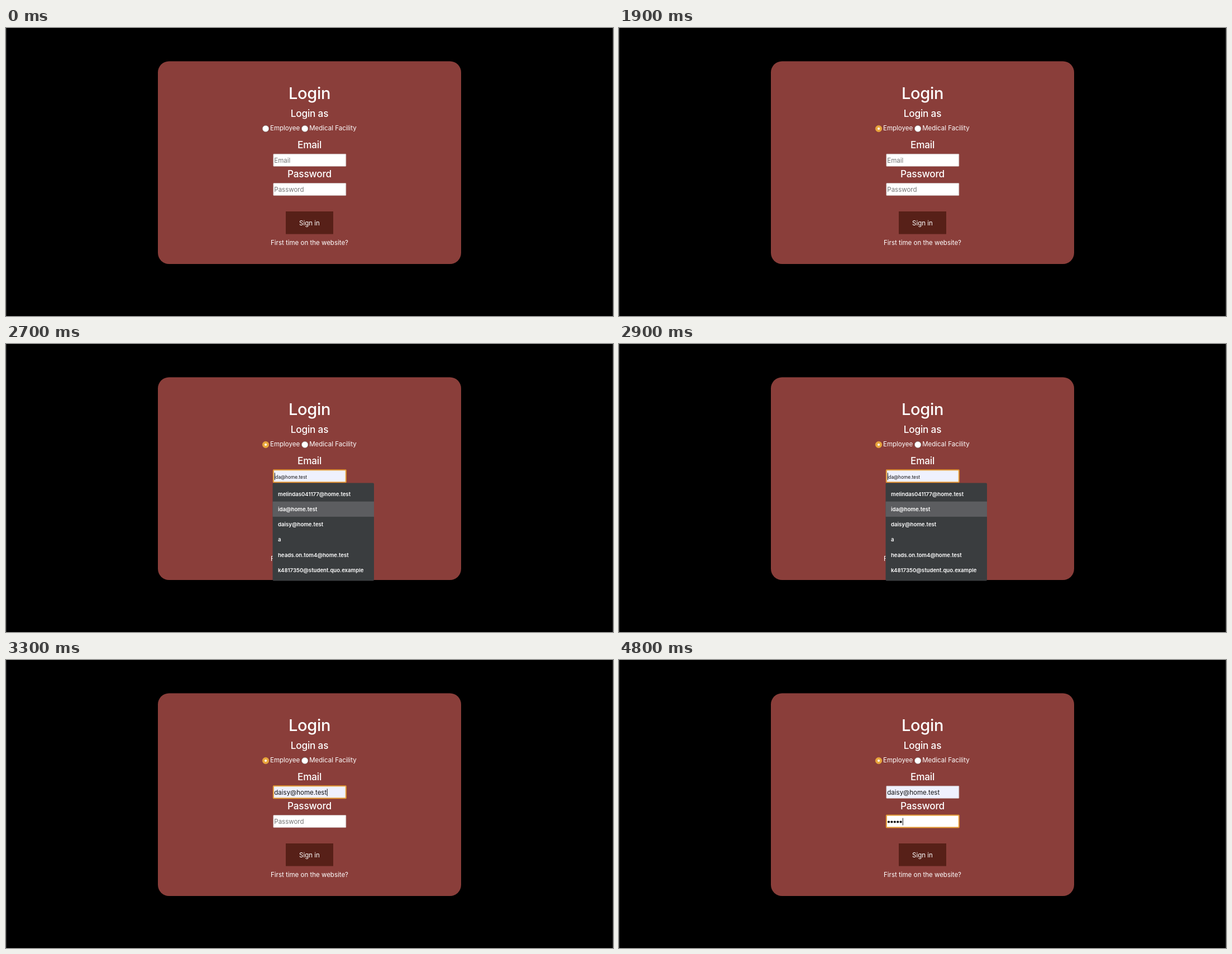
Recreate the animation shown at these times as an HTML page. Size 1087x515 px, loop 4900 ms.

```html
<!DOCTYPE html>
<html lang="en">
<head>
<meta charset="utf-8">
<title>Login</title>
<style>
  html, body { margin: 0; width: 100%; height: 100%; overflow: hidden; background: #000; }
  svg { display: block; }
  text { font: 11.5px Inter, "Open Sans", sans-serif; fill: #fff; }
  .mid { text-anchor: middle; }
  .title { font-size: 29px; font-weight: 500; letter-spacing: -.3px; }
  .head { font-size: 17.2px; font-weight: 500; letter-spacing: -.2px; }
  .field { fill: #fff; stroke: #c4b4b4; stroke-width: .8; }
  .field.filled { fill: #eff1fe; }
  .field.focus { stroke: #e39a35; stroke-width: 2; }
  .value { fill: #111; }
  .value.hint { fill: #767676; }
  .value.preview { font-size: 8.3px; }
  .caret { fill: #111; }
  .item { font-size: 9.6px; font-weight: 600; }
</style>
</head>
<body>
<svg width="1087" height="515" viewBox="0 0 1087 515">
  <path d="M.5 0V515M1086.5 0V515" stroke="#303030"/>
  <rect x="272" y="59.5" width="543" height="362.5" rx="20" fill="#8a3e3a"/>

  <text class="mid title" x="543.5" y="127">Login</text>
  <text class="mid head" x="543.5" y="159">Login as</text>
  <circle id="radio" cx="465" cy="180" r="5.8"/>
  <circle id="radioDot" cx="465" cy="180" r="2" fill="#fff"/>
  <text x="473" y="183">Employee</text>
  <circle cx="535.2" cy="180" r="5.8" fill="#fff" stroke="#777" stroke-width=".6"/>
  <text x="543.2" y="183">Medical Facility</text>

  <text class="mid head" x="543.5" y="215">Email</text>
  <g id="email"></g>
  <text class="mid head" x="543.5" y="267">Password</text>
  <g id="password"></g>

  <rect x="501" y="328" width="85" height="40.5" fill="#572018"/>
  <text class="mid" x="543.5" y="352.7">Sign in</text>
  <text class="mid" x="543.5" y="388">First time on the website?</text>

  <g id="menu">
    <rect x="477.5" y="248.5" width="181.5" height="175" rx="2" fill="#3a3d3f"/>
    <rect id="hover" x="477.5" width="181.5" height="27.2" fill="#5c5d60"/>
  </g>
</svg>
<script>
const LOOP = 4900;
const ROW = 27.2;
const SELECT = 1500, OPEN = 2100, CHOOSE = 3300, NEXT = 3800, TYPE = 4100;
const KEY_GAP = 120, KEYS = 5, DOT_GAP = 5.4;
const HOVERS = [2500, 2700, 3100];
const EMAILS = [
  'melindas041177@home.test',
  'ida@home.test',
  'daisy@home.test',
  'a',
  'heads.on.tom4@home.test',
  'k4817350@student.quo.example'
];

const $ = id => document.getElementById(id);

function add(parent, tag, attrs, text = '') {
  const el = document.createElementNS('http://www.w3.org/2000/svg', tag);
  for (const key in attrs) el.setAttribute(key, attrs[key]);
  el.textContent = text;
  return parent.appendChild(el);
}

const show = (el, on) => el.setAttribute('visibility', on ? 'visible' : 'hidden');

function makeField(id, y) {
  const g = $(id);
  return {
    box: add(g, 'rect', { x: 478.8, y, width: 130, height: 22, rx: .8 }),
    text: add(g, 'text', { x: 480.3, y: y + 15.7 }),
    caret: add(g, 'rect', { class: 'caret', y: y + 5, width: 1, height: 13 })
  };
}

function setField(field, { value, style = '', filled, focus, caretX }) {
  field.box.setAttribute('class', `field ${filled ? 'filled' : ''} ${focus ? 'focus' : ''}`);
  field.text.setAttribute('class', 'value ' + style);
  field.text.textContent = value;
  show(field.caret, caretX !== undefined);
  if (caretX !== undefined) field.caret.setAttribute('x', caretX);
}

const email = makeField('email', 225.3);
const password = makeField('password', 277.6);
const dots = Array.from({ length: KEYS }, (_, i) =>
  add($('password'), 'circle', { cx: 483 + i * DOT_GAP, cy: 289.5, r: 2.1, fill: '#111' }));
EMAILS.forEach((name, i) =>
  add($('menu'), 'text', { class: 'item', x: 487, y: 271.8 + i * ROW }, name));

function draw(t) {
  const checked = t >= SELECT;
  $('radio').setAttribute('fill', checked ? '#e8a53c' : '#fff');
  $('radio').setAttribute('stroke', checked ? '#e8a53c' : '#777');
  $('radio').setAttribute('stroke-width', .6);
  show($('radioDot'), checked);

  const open = t >= OPEN && t < CHOOSE;
  const row = HOVERS.filter(start => t >= start).length - 1;
  show($('menu'), open);
  show($('hover'), open && row >= 0);
  $('hover').setAttribute('y', 254.5 + Math.max(row, 0) * ROW);

  const filled = row >= 0;
  const focus = t >= OPEN && t < NEXT;
  setField(email, {
    value: filled ? EMAILS[row] : 'Email',
    style: !filled ? 'hint' : open ? 'preview' : '',
    filled,
    focus,
    caretX: open && row < 2 ? 480.8 : undefined
  });
  if (focus && !open) {
    show(email.caret, true);
    email.caret.setAttribute('x', 480.8 + email.text.getComputedTextLength());
  }

  const typed = t < TYPE ? 0 : Math.min(KEYS, 1 + Math.floor((t - TYPE) / KEY_GAP));
  setField(password, {
    value: typed ? '' : 'Password',
    style: 'hint',
    focus: t >= NEXT,
    caretX: t >= NEXT ? 480.8 + typed * DOT_GAP : undefined
  });
  dots.forEach((dot, i) => show(dot, i < typed));
}

function tick() {
  draw(performance.now() % LOOP);
  requestAnimationFrame(tick);
}
tick();
</script>
</body>
</html>
```
